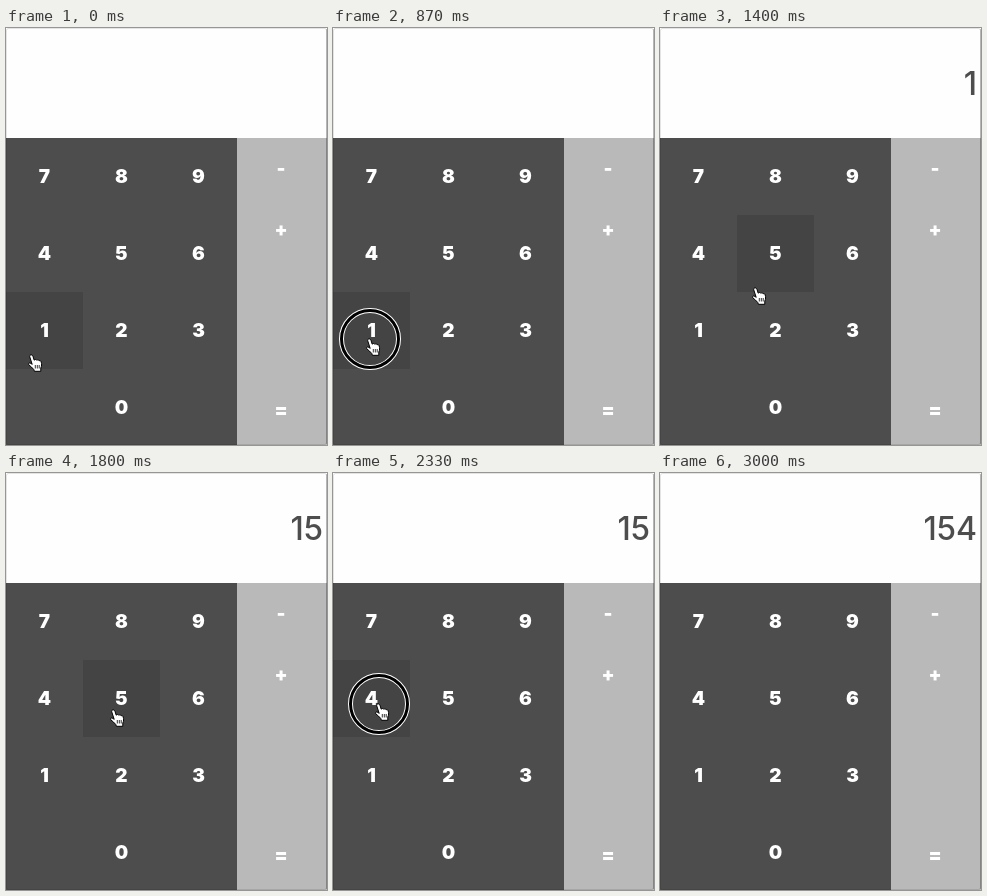
Write an HTML page that moves like this. It is 321x417 px and loops after 3.14 s.

```html
<!DOCTYPE html>
<html lang="en">
<head>
<meta charset="utf-8">
<title>Calculator</title>
<style>
  html, body { margin: 0; width: 100%; height: 100%; overflow: hidden; background: #fff; }
  svg { display: block; width: 321px; height: 417px; }
  text { font-family: Inter, Roboto, sans-serif; }
  #keys text { font-size: 19px; font-weight: 900; fill: #fff; text-anchor: middle; }
  #total { font-size: 32px; font-weight: 450; fill: #4d4d4d; text-anchor: end; }
  #ring circle { fill: none; }
</style>
</head>
<body>
<svg viewBox="0 0 321 417">
  <rect width="321" height="417" fill="#fefefe"/>
  <rect y="110" width="231" height="307" fill="#4d4d4d"/>
  <rect x="231" y="110" width="90" height="307" fill="#b9b9b9"/>
  <rect id="hover" width="77" height="77" fill="#444"/>
  <g id="keys"></g>
  <text id="total" x="317" y="67"></text>
  <rect x=".5" y=".5" width="320" height="416" rx="2" fill="none" stroke="#000" stroke-opacity=".1"/>
  <path d="M320.5 1V416" stroke="#000" stroke-opacity=".2"/>
  <g id="pointer">
    <g id="ring">
      <circle r="28.5" stroke="#fff" stroke-width="5"/>
      <circle r="28.5" stroke="#000" stroke-width="3"/>
    </g>
    <g transform="translate(-5 -1)" stroke="#000" stroke-linejoin="round">
      <path fill="#fff" d="M3.5 1C4.6 .6 5.5 1.2 6 2.4L7.2 6.2C8 5.2 9.4 5.3 9.8 6.3C10.5 5.5 11.8 5.7 12.2 6.8C13.2 6.3 14 7 14.2 8C14.8 10 14.8 12 13.8 14V17.3H7.4L6.8 15.5C5.5 13.8 3.5 12.2 2 11C1 10 1.6 8.7 3 9C3.8 9.2 4.5 9.8 5.2 10.4L2.8 3C2.5 2 2.8 1.3 3.5 1Z"/>
      <path fill="none" stroke-width=".8" d="M8.3 11V14.5M10.3 11V14.5M12.2 11V14.5"/>
    </g>
  </g>
</svg>
<script>
const LOOP = 3140, FPS = 15, CELL = 77, TOP = 110, HIDE = 2800;
const $ = id => document.getElementById(id);

// Pointer stops, and the moves between them as eased curves
const rest = [26, 327], one = [37, 311], five = [108, 237], four = [46, 231], minus = [266, 137];
const middle = (a, b) => a.map((v, i) => (v + b[i]) / 2);
const move = (start, end, from, to, via = middle(from, to)) => ({ start, end, from, to, via });
const moves = [
  move(0, 200, rest, one),
  move(1080, 1640, one, five, [105, 262]),
  move(1830, 2300, five, four),
  move(2600, 2730, four, minus)
];
const clicks = [
  { down: 870, up: 1000, digit: '1' },
  { down: 1670, up: 1800, digit: '5' },
  { down: 2330, up: 2470, digit: '4' }
];

const key = (label, x, y) =>
  $('keys').insertAdjacentHTML('beforeend', `<text x="${x}" y="${y}">${label}</text>`);
[...'789456123'].forEach((d, i) => key(d, 38.5 + i % 3 * CELL, 155 + Math.floor(i / 3) * CELL));
key('0', 115.5, 386);
key('-', 275, 146.5);
key('+', 275, 208);
key('=', 275, 389);

const show = (id, on) => $(id).setAttribute('visibility', on ? 'visible' : 'hidden');

function pointerAt(t) {
  const { start, end, from, to, via } = moves.findLast(m => m.start <= t);
  const u = Math.min(1, (t - start) / (end - start));
  const s = u * u * (3 - 2 * u), r = 1 - s;
  return from.map((v, i) => Math.round(r * r * v + 2 * r * s * via[i] + s * s * to[i]));
}

function draw(now) {
  // Snap to the recording's frame rate, with delays in whole hundredths of a second
  const frame = Math.floor((now % LOOP + 4) * FPS / 1000);
  const t = Math.round(frame * 100 / FPS) * 10;

  const [x, y] = pointerAt(t), visible = t < HIDE;
  show('pointer', visible);
  $('pointer').setAttribute('transform', `translate(${x} ${y})`);
  show('ring', visible && clicks.some(c => t >= c.down && t < c.up));

  const col = Math.floor(x / CELL), row = Math.floor((y - TOP) / CELL);
  show('hover', visible && col < 3);
  $('hover').setAttribute('x', col * CELL);
  $('hover').setAttribute('y', TOP + row * CELL);

  $('total').textContent = clicks.filter(c => t >= c.up).map(c => c.digit).join('');
}

const start = performance.now();
function tick() {
  draw(performance.now() - start);
  requestAnimationFrame(tick);
}
tick();
</script>
</body>
</html>
```
